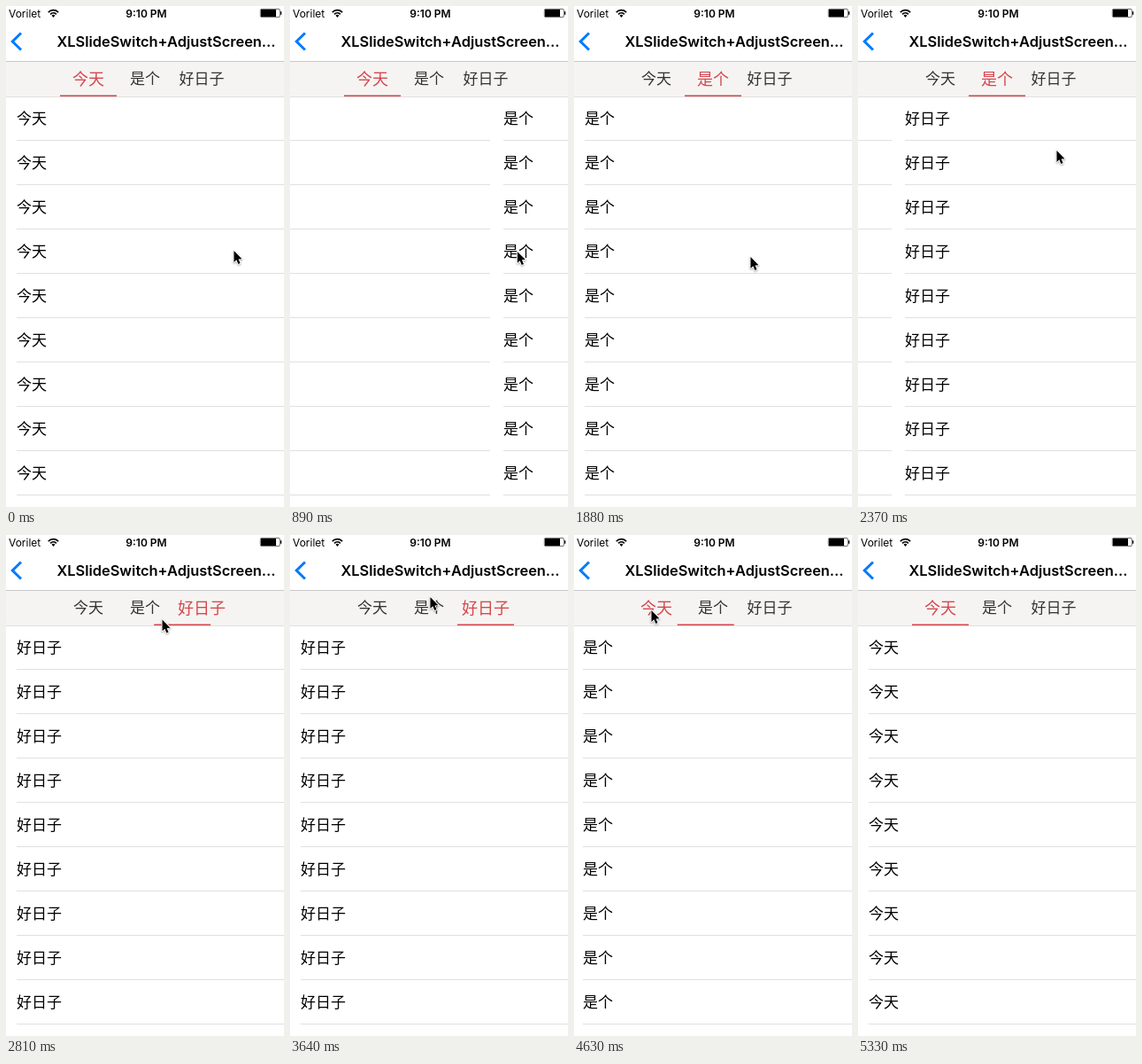
An HTML page with a canvas that plays this animation: 314x565 px, repeating every 5650 ms.

```html
<!DOCTYPE html>
<html lang="zh-CN">
<head>
<meta charset="utf-8">
<title>Slide switch</title>
<style>
  html, body { margin: 0; width: 100%; height: 100%; overflow: hidden; background: #fff; }
  canvas { display: block; }
</style>
</head>
<body>
<canvas id="stage"></canvas>
<script>
const W = 314, H = 565, LOOP = 5650;
const PAGE = 320, EDGE = -3, INSET = 15, ROW = 50;
const TAB = 64, TAB_LEFT = 61;
const RED = '#d4464e';
const LATIN = 'Inter, Roboto, sans-serif';
const HAN = '"Noto Sans CJK SC", "Noto Sans CJK", sans-serif';
const labels = ['今天', '是个', '好日子'];

const canvas = document.getElementById('stage');
const ratio = window.devicePixelRatio || 1;
canvas.width = W * ratio;
canvas.height = H * ratio;
canvas.style.width = W + 'px';
canvas.style.height = H + 'px';
const ctx = canvas.getContext('2d');

const clamp = x => Math.min(1, Math.max(0, x));
const mix = (a, b, u) => a + (b - a) * u;
const span = (t, start, time) => clamp((t - start) / time);
const easeOut = u => 1 - (1 - u) ** 3;
const easeInOut = u => u < 0.5 ? 2 * u * u : 1 - 2 * (1 - u) ** 2;

// A flick drags the page, pauses, glides on and then changes the tab
function flick(start, time) {
  const glide = start + 275;
  return {
    dir: 1,
    pick: glide + time,
    shift(t) {
      if (t < start) return 0;
      const dragged = mix(0.23, 0.33, span(t, start, 130));
      return mix(dragged, 1, easeOut(span(t, glide, time)));
    }
  };
}

// A tap changes the tab at once and slides the page back
const tap = start => ({
  dir: -1,
  pick: start,
  shift: t => easeOut(span(t, start + 90, 640))
});

const moves = [flick(820, 405), flick(1900, 460), tap(4020), tap(4555)];
const total = part => moves.reduce((sum, m) => sum + m.dir * part(m), 0);

// Pointer stops: departure, travel time, x, y
const stops = [
  [820, 400, 247, 290],
  [1500, 360, 199, 283],
  [1900, 450, 224, 163],
  [2370, 700, 158, 70],
  [3640, 140, 155, 84],
  [4100, 380, 87, 85],
  [4690, 640, 320, 570]
];

function pointerAt(t) {
  let x = 257, y = 276;
  for (const [start, time, toX, toY] of stops) {
    const u = easeInOut(span(t, start, time));
    x = mix(x, toX, u);
    y = mix(y, toY, u);
  }
  return [x, y];
}

function rect(x, y, w, h, color) {
  ctx.fillStyle = color;
  ctx.fillRect(x, y, w, h);
}

function text(str, x, y, font, color = '#000', align = 'left') {
  ctx.font = font;
  ctx.fillStyle = color;
  ctx.textAlign = align;
  ctx.fillText(str, x, y);
}

function poly(points, close) {
  ctx.beginPath();
  points.forEach(([x, y]) => ctx.lineTo(x, y));
  if (close) ctx.closePath();
}

function drawPage(i, offset) {
  const x = EDGE + i * PAGE - offset;
  if (x >= W || x + PAGE <= 0) return;
  for (let y = 102; y < H; y += ROW) {
    text(labels[i], x + INSET, y + 31, '17px ' + HAN);
    rect(x + INSET, y + 49, PAGE - INSET, 1, '#e0e0e2');
  }
}

function drawWifi() {
  ctx.strokeStyle = ctx.fillStyle = '#000';
  ctx.lineWidth = 1.7;
  for (const r of [2.6, 4.6, 7.8]) {
    ctx.beginPath();
    if (r < 3) ctx.moveTo(53.5, 13);
    ctx.arc(53.5, 12.5, r, -Math.PI * 0.76, -Math.PI * 0.24);
    if (r < 3) ctx.fill();
    else ctx.stroke();
  }
}

function drawBattery() {
  ctx.strokeStyle = '#000';
  ctx.lineWidth = 0.6;
  ctx.beginPath();
  ctx.roundRect(287.3, 3.4, 22, 9.2, 1.5);
  ctx.stroke();
  rect(288, 4, 17, 8, '#000');
  rect(310, 6.2, 1.2, 3.6, '#000');
}

function drawStatus() {
  text('Vorilet', 3, 12.5, '12px ' + LATIN);
  text('9:10 PM', 158.5, 12.5, '600 12px ' + LATIN, '#000', 'center');
  drawWifi();
  drawBattery();
}

function drawNav() {
  ctx.strokeStyle = '#007aff';
  ctx.lineWidth = 3;
  poly([[17, 30.5], [7.3, 40], [17, 49.5]]);
  ctx.stroke();
  text('XLSlideSwitch+AdjustScreen...', 181, 46, '600 16.4px ' + LATIN, '#000', 'center');
  rect(0, 62, W, 1, '#c9c8c8');
}

function drawTabs(tab, bar) {
  rect(0, 63, W, 39, '#f6f4f2');
  rect(0, 102, W, 1, '#e0e0e0');
  labels.forEach((s, i) => {
    const on = i === tab, size = on ? 18 : 17;
    text(s, TAB_LEFT + TAB * (i + 0.5), Math.round(82.3 + size * 0.36),
      size + 'px ' + HAN, on ? RED : '#333', 'center');
  });
  rect(TAB_LEFT + TAB * bar, 100.5, TAB, 1.5, RED);
}

function drawPointer([x, y]) {
  ctx.save();
  ctx.translate(x, y);
  ctx.scale(0.92, 0.92);
  poly([[0.5, 0], [0.5, 14], [3.6, 11.2], [5.8, 16.3], [8.2, 15.3], [6, 10.3], [10.3, 10]], true);
  ctx.shadowColor = 'rgba(0,0,0,0.35)';
  ctx.shadowBlur = 2 * ratio;
  ctx.shadowOffsetY = ratio;
  ctx.lineWidth = 2;
  ctx.lineJoin = 'round';
  ctx.strokeStyle = '#fff';
  ctx.stroke();
  ctx.shadowColor = 'transparent';
  ctx.fillStyle = '#000';
  ctx.fill();
  ctx.restore();
}

function draw(t) {
  ctx.setTransform(ratio, 0, 0, ratio, 0, 0);
  rect(0, 0, W, H, '#fff');
  const offset = Math.round(PAGE * total(m => m.shift(t)));
  labels.forEach((_, i) => drawPage(i, offset));
  drawStatus();
  drawNav();
  drawTabs(total(m => t >= m.pick), total(m => easeInOut(span(t, m.pick, 300))));
  drawPointer(pointerAt(t));
}

const begin = performance.now();
function tick() {
  draw((performance.now() - begin) % LOOP);
  requestAnimationFrame(tick);
}
tick();
</script>
</body>
</html>
```
